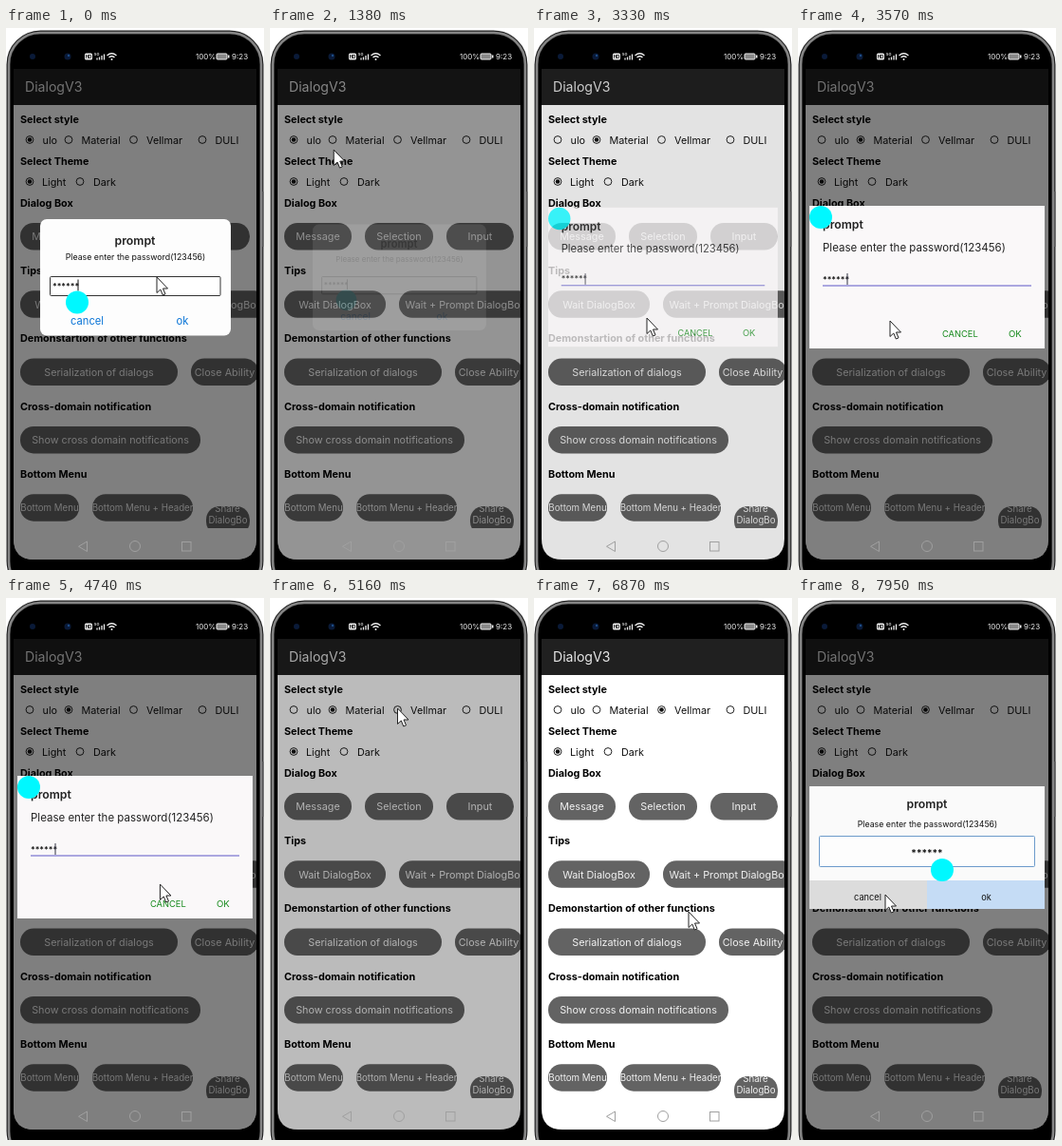
Write an HTML page that moves like this. It is 272x570 px and loops after 8000 ms.

```html
<!DOCTYPE html>
<html lang="en">
<head>
<meta charset="utf-8">
<title>Dialog demo</title>
<style>
html, body { margin: 0; width: 100%; height: 100%; overflow: hidden; background: #fff; }
svg { display: block; width: 272px; height: 570px; font-family: Inter, Roboto, sans-serif; }
</style>
</head>
<body>
<svg id="stage" viewBox="0 0 272 570" xmlns="http://www.w3.org/2000/svg"></svg>
<script>
const rect = (x, y, w, h, fill, r = 0, extra = '') =>
  `<rect x="${x}" y="${y}" width="${w}" height="${h}" rx="${r}" fill="${fill}" ${extra}/>`;
const circle = (x, y, r, fill, extra = '') =>
  `<circle cx="${x}" cy="${y}" r="${r}" fill="${fill}" ${extra}/>`;
const path = (d, extra = '') => `<path d="${d}" ${extra}/>`;
// y is the middle of the capitals
const text = (s, x, y, size = 10.8, fill = '#111', weight = 400, anchor = 'start') =>
  `<text x="${x}" y="${y}" dy=".36em" font-size="${size}" fill="${fill}" font-weight="${weight}" text-anchor="${anchor}">${s}</text>`;
const mid = (s, x, y, size, fill, weight) => text(s, x, y, size, fill, weight, 'middle');

const heading = (s, y) => text(s, 15, y, 10.8, '#000', 700);
const button = (s, x, y, w, size) =>
  rect(x, y, w, 28.5, '#636363', 14) + mid(s, x + w / 2, y + 14.5, size, '#f2f2f2');
const radio = (s, x, y, labelX, id) =>
  circle(x, y - .5, 3.9, 'none', 'stroke="#222"') +
  circle(x, y - .5, 2.3, '#111', `id="${id}"`) + text(s, labelX, y);
const section = (title, row, buttons, size) => heading(title, 184 + 71.3 * row) +
  buttons.map(([s, x, w]) => button(s, x, 205 + 71.3 * row, w, size)).join('');

const phone =
  rect(2.5, 4.5, 267, 590, '#000', 34, 'stroke="#222" stroke-width="4"') +
  rect(3, 5, 266, 589, 'none', 33, 'stroke="#858585" stroke-width="2.5"') +
  rect(270.5, 172, 1.5, 58, '#777');

const statusBar =
  circle(28, 30, 3, '#0a1a38') + circle(65, 30, 3.5, '#0a1a38') + circle(66, 29, 1.2, '#1d4c86') +
  rect(83, 26.5, 8, 7, '#eee', 1.5) + mid('HD', 87, 30, 4.5, '#000', 700) +
  text('5G', 93, 28, 4, '#eee', 600) +
  `<g fill="none" stroke="#eee" stroke-width="1.3">${path('M96 33.5v-2m2.5 2v-3m2.5 3v-4.5m2.5 4.5v-6')}` +
  path('M106.5 29q5-4.5 10 0m-8 2q3-2.5 6 0') + '</g>' + circle(111.5, 33, 1, '#eee') +
  text('100%', 200, 30, 8, '#eee') +
  rect(222, 27, 11, 6, '#888', 1, 'stroke="#eee"') + rect(234, 28.5, 1.5, 3, '#eee') +
  text('9:23', 238, 30, 8, '#eee');

const radioX = [25, 66, 134.5, 207];
const styles = ['ulo', 'Material', 'Vellmar', 'DULI'];

const page =
  rect(8, 43, 256, 38, '#202020') + text('DialogV3', 20, 62, 14.1, '#e8e8e8') +
  heading('Select style', 96) +
  styles.map((s, i) => radio(s, radioX[i], 118, radioX[i] + 13.5, 'style' + i)).join('') +
  heading('Select Theme', 140) +
  radio('Light', 25, 162, 38, 'light') + radio('Dark', 78, 162, 92, 'dark') +
  section('Dialog Box', 0, [['Message', 15, 71], ['Selection', 100, 72], ['Input', 186, 71]]) +
  section('Tips', 1, [['Wait DialogBox', 15, 107], ['Wait + Prompt DialogBox', 136, 140]]) +
  section('Demonstartion of other functions', 2,
    [['Serialization of dialogs', 15, 166], ['Close Ability', 195, 71]]) +
  section('Cross-domain notification', 3, [['Show cross domain notifications', 15, 190]]) +
  section('Bottom Menu', 4, [['Bottom Menu', 15, 62], ['Bottom Menu + Header', 91, 106]], 9.7) +
  `<g clip-path="url(#tile)">${rect(211, 503, 46, 30, '#636363', 14)}` +
  mid('Share', 233.5, 506, 9.7, '#f2f2f2') + mid('DialogBo', 234, 518, 9.7, '#f2f2f2') + '</g>';

const navBar = `<g fill="none" stroke="#a0a0a0">${path('M85.5 540v10.5l-9-5.25z')}` +
  circle(136, 545, 5.5, 'none') + rect(185.5, 540.5, 9.5, 9.5, 'none') + '</g>';

const question = 'Please enter the password(123456)';
const title = (x, y, anchor) => text('prompt', x, y, 12.3, '#222', 600, anchor);
const stars = (x, y, size = 8.7, anchor) => text('******', x, y, size, '#111', 600, anchor);
const handle = (x, y) => circle(x, y, 12, '#00f8ff');

const dialogs = [
  rect(36, 201, 201, 122.5, '#fdfdfd', 7) +
  title(136, 224, 'middle') + mid(question, 136.5, 241, 8.8) +
  rect(46.5, 261.5, 179.5, 20, '#fff', 1, 'stroke="#333"') +
  stars(49, 271.5) + rect(75.5, 264.5, 1, 12, '#111') + handle(75, 288.5) +
  mid('cancel', 85.5, 308, 11.2, '#0a74d6') + mid('ok', 186, 308, 11.2, '#0a74d6'),

  rect(12, 187, 248, 150, '#faf8f9') +
  title(26, 207) + text(question, 26, 231, 11.5, '#222') +
  stars(26, 264.5) + rect(51.5, 258, 1, 12, '#334') + rect(26, 270.5, 220, 1, '#5f58c8') +
  text('CANCEL', 152, 322, 9.3, '#168a1c') + text('OK', 222, 322, 9.6, '#168a1c') +
  handle(24, 199),

  rect(12, 198, 248, 129, '#fafafa') +
  title(136, 217, 'middle') + mid(question, 136.5, 238, 8.8) +
  rect(22.5, 250.5, 227, 32, '#fdfdfd', 1, 'stroke="#6d9bcb"') + stars(136, 268, 10.3, 'middle') +
  rect(12, 297, 124, 30, '#dcdcdc') + rect(136, 297, 124, 30, '#c5dcf5') +
  mid('cancel', 73.5, 315, 9.2) + mid('ok', 198.5, 315, 9.2) + handle(152, 286)
];

const stage = document.getElementById('stage');
stage.innerHTML =
  `<clipPath id="screen">${path('M8 43H264V537Q264 559 242 559H30Q8 559 8 537Z')}</clipPath>` +
  `<clipPath id="tile">${rect(211, 502.5, 46, 23.5, '#000')}</clipPath>` +
  phone + statusBar +
  `<g clip-path="url(#screen)">${rect(8, 43, 256, 517, '#fff')}${page}` +
  rect(8, 43, 256, 517, '#000', 0, 'id="scrim"') + '</g>' + navBar +
  dialogs.map((body, i) => `<g id="dialog${i}">${body}</g>`).join('') +
  path('M0 0V16.5L3.8 13L6.3 19L9 17.8L6.5 12H11.5Z',
    'id="cursor" fill="#fff" stroke="#222" stroke-linejoin="round"');

const set = (id, name, value) => document.getElementById(id).setAttribute(name, value);
const ramp = (a, b, t) => Math.min(1, Math.max(0, (t - a) / (b - a)));

// Each round: the dialog opens, is cancelled, the next style is picked, Input is pressed
const ROUND = 3700, OFFSET = 500;
const approach = [[159, 262], [119, 305], [163, 330]];
const rest = [[159, 262], [97, 308], [110, 345]];
const cancel = [[85, 303], [165, 318], [92, 312]];
const stops = approach.flatMap((from, i) => [
  [-30, 150, from], [370, 620, rest[i]], [950, 1450, cancel[i]],
  [1960, 2480, [radioX[i + 1], 116]], [2980, 3370, [221, 216]]
].map(([arrive, leave, pos]) => ({ arrive: arrive + i * ROUND, leave: leave + i * ROUND, pos })));

function cursorAt(t) {
  const i = stops.findIndex(s => s.arrive > t);
  const a = stops[i - 1], b = stops[i];
  const p = ramp(a.leave, b.arrive, t), e = p * p * (3 - 2 * p);
  return a.pos.map((v, k) => v + (b.pos[k] - v) * e);
}

function draw(time) {
  const t = time + OFFSET, round = Math.floor(t / ROUND), u = t % ROUND;
  const open = (1 - (1 - ramp(0, 260, u)) ** 2) * (1 - ramp(1700, 1900, u));
  const scrim = ramp(0, 280, u) ** 2 * (1 - ramp(1840, 2100, u));
  const picked = round + (u > 2430);
  set('cursor', 'transform', `translate(${cursorAt(t)})`);
  set('scrim', 'opacity', scrim / 2);
  dialogs.forEach((_, i) => {
    set('dialog' + i, 'opacity', i === round ? open : 0);
    set('dialog' + i, 'transform', `translate(136 262) scale(${.9 + .1 * open}) translate(-136 -262)`);
  });
  styles.forEach((_, i) => set('style' + i, 'opacity', +(i === picked)));
}

set('dark', 'opacity', 0);
const start = performance.now();
function tick() {
  draw((performance.now() - start) % 8000);
  requestAnimationFrame(tick);
}
tick();
</script>
</body>
</html>
```
